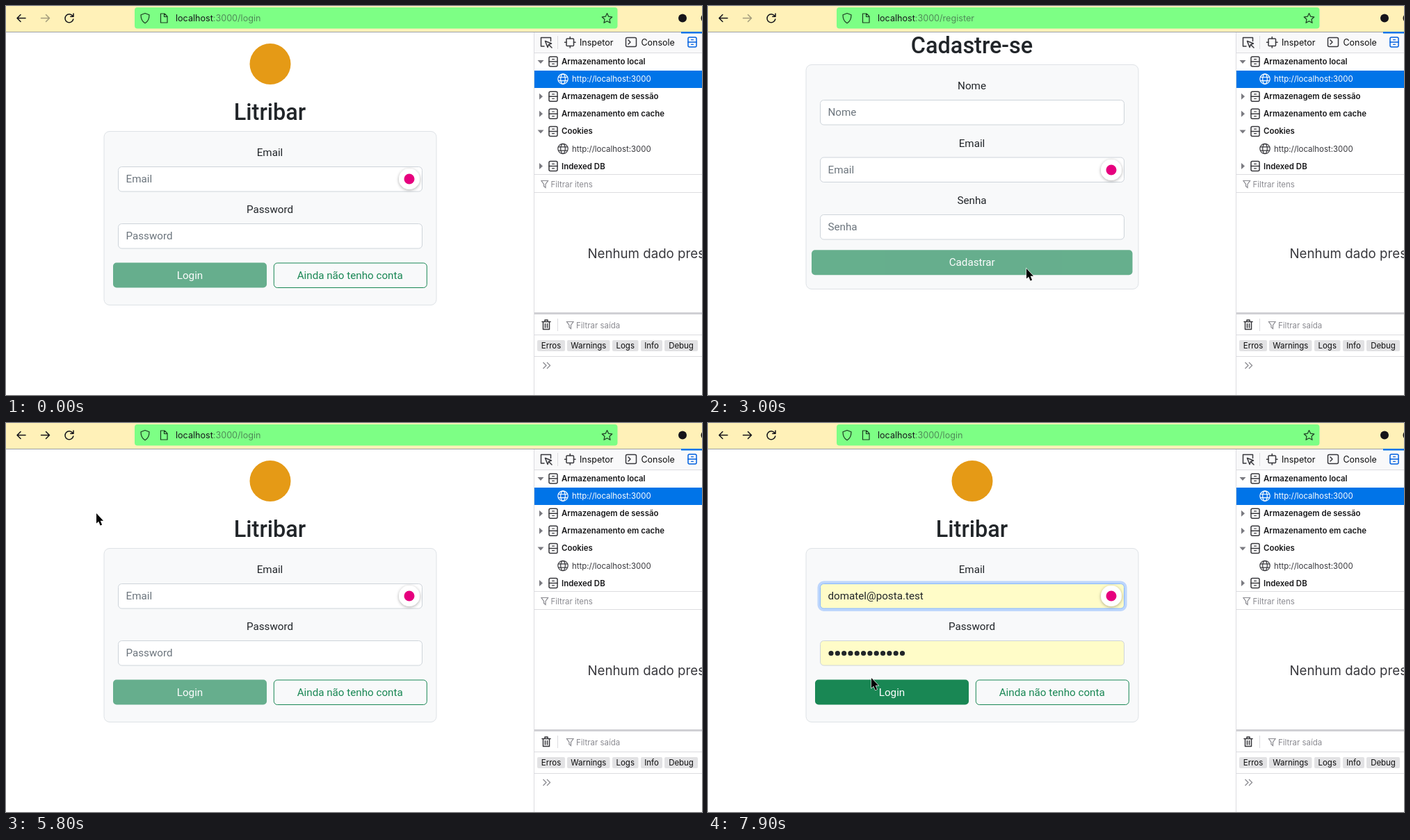
Recreate the animation shown at these times as an HTML page. Size 1001 px wide and 560 px high, loop 8000 ms.

```html
<!DOCTYPE html>
<html lang="pt-BR">
<head>
<meta charset="utf-8">
<title>Login</title>
<style>
  html, body { margin: 0; width: 100%; height: 100%; overflow: hidden; background: #fff; }
  svg { display: block; width: 100vw; height: 100vh; }
  text { white-space: pre; }
  .page { font: 15.2px Roboto, sans-serif; fill: #212529; text-anchor: middle; }
  .page .left { text-anchor: start; }
  .title { font-size: 32.4px; font-weight: 500; }
  .hint { fill: #6c757d; }
  .ui { font: 11.44px Inter, sans-serif; fill: #38383d; }
  .bold { font-weight: 600; fill: #18181a; }
  .tab { font-size: 12.48px; fill: #0c0c0d; }
  .menu { font: 12px Inter, sans-serif; fill: #1c1b22; }
  .muted { fill: #8a8a90; }
  .line { fill: none; stroke: currentColor; stroke-width: 1.5; stroke-linecap: round; stroke-linejoin: round; }
  .thin { stroke-width: 1.2; }
</style>
</head>
<body>
<svg id="stage" viewBox="0 0 1001 560">
  <defs>
    <filter id="shadow" x="-20%" y="-20%" width="140%" height="150%">
      <feDropShadow dx="0" dy="1" stdDeviation="2" flood-opacity=".35"/>
    </filter>
    <g id="cabinet" class="line">
      <rect x="-6" y="-7" width="12" height="14" rx="2"/>
      <path d="M-6 0H6"/><path class="thin" d="M-1.5-3.3h3M-1.5 3.3h3"/>
    </g>
    <g id="globe" class="line thin">
      <circle r="7.2"/><ellipse rx="3.3" ry="7.2"/><path d="M-6.5-2.6H6.5M-6.5 2.6H6.5"/>
    </g>
    <path id="funnel" d="M-4.5-5h9.5l-3.5 5v5l-2.5-2v-3z" fill="none" stroke="#8a8a90" stroke-width="1.2"/>
    <g id="badge">
      <circle r="15" fill="#fff" filter="url(#shadow)"/><circle r="7.5" fill="#e6007e"/>
    </g>
    <path id="beamShape" d="M-3-6.5Q0-6.5 0-4V4Q0 6.5-3 6.5M3-6.5Q0-6.5 0-4M0 4Q0 6.5 3 6.5M-1.5 1h3"/>
  </defs>

  <rect width="1001" height="37" fill="#fff1b8"/>
  <path d="M0 37.5H1001" stroke="#9ba0a3"/>
  <rect id="backHighlight" x="7" y="2" width="30" height="30.5" rx="4"/>
  <path class="line" color="#15141a" d="M28 17.5H16M21 12.5l-5 5 5 5"/>
  <path id="forwardArrow" class="line" d="M50.5 17.5h12M57.5 12.5l5 5-5 5"/>
  <path class="line" color="#15141a" d="M96 14.5a6 6 0 1 0 .8 4.5M97 11v4.2h-4.2"/>
  <rect x="185" y="2" width="694.5" height="30.5" rx="4" fill="#7dff85"/>
  <g class="line thin" color="#1c3a22">
    <path d="M200 10.5l6 2.2c0 6-1.5 9.5-6 12-4.5-2.5-6-6-6-12z"/>
    <path d="M222.5 11h5.5l4 4v9h-9.5zM227.5 11v4.5h4.5"/>
    <path d="M864.5 10.5l2.2 4.7 5.1.6-3.8 3.5 1 5-4.5-2.5-4.5 2.5 1-5-3.8-3.5 5.1-.6z"/>
  </g>
  <text class="ui" x="244" y="22" style="font-size:12.6px"><tspan fill="#15141a">localhost</tspan><tspan id="path" fill="#4f8a58"></tspan></text>
  <circle cx="973" cy="17.5" r="6" fill="#15141a"/>
  <circle cx="1006" cy="17.5" r="6.5" fill="#15141a"/>

  <g id="login" class="page"></g>
  <g id="register" class="page"></g>
  <g id="devtools" class="ui"></g>

  <g id="menu" class="menu"></g>
  <g id="tooltip" class="ui">
    <rect x="17" y="35" width="396" height="38" rx="3" fill="#f9f9fb" stroke="#c8c8cc" filter="url(#shadow)"/>
    <text x="24" y="51">Voltar uma página (Alt+Seta para a esquerda)</text>
    <text x="24" y="66">Clique com o botão direito ou pressione para ver o histórico</text>
  </g>

  <path id="arrow" d="M0 0V14.5L3.2 11.7 5.6 17.5 8.1 16.4 5.7 10.8H10Z" stroke="#fff" stroke-width="1.2" paint-order="stroke"/>
  <g id="beam" fill="none" stroke-linecap="round">
    <use href="#beamShape" stroke="#fff" stroke-width="2.6"/>
    <use href="#beamShape" stroke="#111" stroke-width="1.2"/>
  </g>
  <path id="hand" d="M-1.5 1.5q0-1.5 1.5-1.5t1.5 1.5v5l5.5 1q2 .5 2 2.5l-1 4.500-1 3h-7l-4.5-6.5q-.5-2 1.5-1.5l1.500 1.5z" stroke="#fff"/>
</svg>

<script>
const $ = id => document.getElementById(id);
const text = (x, y, s, cls = '', more = '') => `<text x="${x}" y="${y}" class="${cls}" ${more}>${s}</text>`;
const rect = (x, y, w, h, fill, more = '') => `<rect x="${x}" y="${y}" width="${w}" height="${h}" fill="${fill}" ${more}/>`;
const icon = (name, x, y, color) => `<use href="#${name}" x="${x}" y="${y}" color="${color}"/>`;

const card = (y, h) => rect(141, y, 478, h, '#f8f9fa', 'rx="8" stroke="#dee2e6"');
const field = (y, name, id = '') =>
  text(379.5, y - 15, name) +
  rect(161.5, y + .5, 437, 35.5, '#fff', `rx="5" stroke="#ced4da" id="${id}Box"`) +
  text(172.5, y + 23, name, 'left hint', `id="${id}Value"`);
const button = (x, y, w, label, id = '') =>
  `<g opacity=".65" id="${id}">${rect(x, y, w, 36, '#198754', 'rx="5"')}` +
  text(x + w / 2, y + 23, label, '', 'fill="#fff"') + '</g>';

$('login').innerHTML =
  '<circle cx="380" cy="83.5" r="29.5" fill="#e59a16"/>' +
  text(379.5, 164, 'Litribar', 'title') + card(180.5, 250) +
  rect(159.5, 229.5, 441, 39.5, 'none', 'id="ring" rx="7" stroke="#0d6efd" stroke-opacity=".25" stroke-width="4"') +
  field(231, 'Email', 'email') + field(313, 'Password', 'password') +
  '<path id="dots" d="M177 331.5H280" stroke="#212529" stroke-width="7.2" stroke-linecap="round" stroke-dasharray="0 9.32"/>' +
  '<path id="caret" d="M173.5 239.5v18" stroke="#212529"/>' +
  icon('badge', 580, 249) + button(154, 369.5, 221, 'Login', 'submit') +
  rect(385.3, 370, 220, 35.5, 'none', 'rx="5" stroke="#198754" id="signup"') +
  text(494.7, 392.5, 'Ainda não tenho conta', '', 'id="signupLabel"');

$('register').innerHTML =
  text(379.5, 68, 'Cadastre-se', 'title') + card(84.5, 323) +
  field(135, 'Nome') + field(217.5, 'Email') + field(300, 'Senha') +
  icon('badge', 580, 236) + button(149, 351.3, 461.5, 'Cadastrar');

// Storage tree rows: label, indented under its parent, open
const tree = [
  ['Armazenamento local', 0, 1], ['http://localhost:3000', 1], ['Armazenagem de sessão', 0, 0],
  ['Armazenamento em cache', 0, 0], ['Cookies', 0, 1], ['http://localhost:3000', 1], ['Indexed DB', 0, 0]
];
const rows = tree.map(([label, child, open], i) => {
  const y = 80 + i * 25.1, selected = i === 1, color = selected ? '#fff' : '#38383d';
  if (child) return (selected ? rect(760, 93, 241, 25, '#0074e8') : '') +
    icon('globe', 801, y, color) + text(814, y + 4, label, '', `style="fill:${color}"`);
  const twisty = open ? 'M764.5 -2h9l-4.5 5z' : 'M767 -4.5v9l5-4.5z';
  return `<path d="${twisty}" transform="translate(0 ${y})" fill="#7a7a80"/>` +
    icon('cabinet', 787, y, color) + text(799, y + 4, label, 'bold');
}).join('');
const filters = [['Erros', 764, 40], ['Warnings', 807, 61.5], ['Logs', 872, 37.5], ['Info', 913, 31], ['Debug', 947, 48]]
  .map(([label, x, w]) => rect(x, 481, w, 16, '#e2e2e4', 'rx="2"') +
    text(x + w / 2, 493, label, '', 'text-anchor="middle" fill="#0c0c0d"')).join('');

$('devtools').innerHTML =
  rect(760, 38, 241, 522, '#fff') + rect(760, 38, 241, 30, '#f9f9fa') + rect(971, 37, 30, 2.5, '#0074e8') +
  '<path d="M759.5 38V560M760 67.5H1001M793.5 43V62M760 242.5H1001M760 268.5H1001M760 473.5H1001M760 504.5H1001M793.5 450V468" stroke="#dcdce0" fill="none"/>' +
  rect(760, 441, 241, 3, '#d0d0d4') +
  '<g class="line" color="#38383d"><path d="M774 58h-4.5v-12.5h14v5M775.5 50.5l9 3.5-4 1.5-1.5 4zM781 56l4 4"/>' +
  '<rect x="806" y="47" width="10.5" height="10.5" rx="1"/><path d="M811.25 44.5v2.5M811.25 57.5v2.5M803.5 52.25h2.5M816.5 52.25h2.5"/>' +
  '<rect x="891.5" y="45.5" width="15" height="13" rx="2"/><path d="M895 49l3 3-3 3"/>' +
  '<path d="M771 454.5h12M775 454v-2h4v2M772.5 455v10.5h9V455M775.5 457.5v5.5M778.5 457.5v5.5"/></g>' +
  icon('cabinet', 987, 52, '#0060df') +
  text(825, 56.5, 'Inspetor', 'tab') + text(913.5, 56.5, 'Console', 'tab') + rows +
  icon('funnel', 774.5, 256.5) + text(783.5, 260.5, 'Filtrar itens', 'muted') +
  text(836.5, 363, 'Nenhum dado presente', '', 'style="font-size:18.7px"') +
  icon('funnel', 811, 459.5) + text(820, 463.5, 'Filtrar saída', 'muted') + filters +
  '<path d="M772.5 513l4.5 4.5-4.5 4.5M778 513l4.5 4.5-4.5 4.5" fill="none" stroke="#8a8a90" stroke-width="1.3"/>';

const accounts = ['brenodalmonte58@posta.test', 'dalmamorim@posta.test', 'domatel@posta.test'];
$('menu').innerHTML =
  rect(161, 267, 436.5, 155, '#fff', 'rx="3" stroke="#b0b0b4" stroke-width=".8" filter="url(#shadow)"') +
  rect(162, 348, 434, 38.5, '#dadbdc', 'id="hover"') +
  accounts.map((mail, i) => {
    const y = 282.5 + i * 38.2;
    return `<circle cx="174.5" cy="${y}" r="7" fill="#72bfe9"/>` +
      text(185.5, y + 4, mail) + text(185.5, y + 20, 'deste site', 'muted');
  }).join('') +
  rect(162, 386.5, 434, 32, '#ebebeb') + '<path d="M162 386.5H596" stroke="#cfcfd2"/>' +
  text(378, 407, 'Ver contas de acesso salvas', '', 'text-anchor="middle"');

// Pointer path: time, x, y
const pointer = [
  [100, 319, 54], [200, 327, 151], [300, 327, 151], [400, 306, 226], [500, 306, 226], [600, 303, 235], [700, 301, 241],
  [1000, 301, 241], [1100, 377, 311], [1200, 432, 357], [1300, 456, 378], [1400, 464, 385], [2900, 464, 385],
  [3000, 458, 378], [3200, 380, 308], [3600, 95, 75], [3800, 27, 18], [3900, 14, 13],
  [5500, 14, 13], [5800, 130, 130], [6000, 222, 235], [6100, 232, 253.5],
  [7000, 232, 253.5], [7100, 233, 275], [7200, 234, 322], [7300, 235, 361], [7500, 235, 367], [8000, 235, 367]
];
function pointerAt(t) {
  const i = Math.max(1, pointer.findIndex(p => p[0] >= t));
  const [t0, x0, y0] = pointer[i - 1], [t1, x1, y1] = pointer[i];
  const k = (t - t0) / (t1 - t0);
  return [x0 + (x1 - x0) * k, y0 + (y1 - y0) * k];
}

const show = (id, on) => $(id).style.display = on ? '' : 'none';
const between = (t, a, b) => t >= a && t < b;

function render(t) {
  const registering = between(t, 2000, 5500), filled = t >= 7700, focused = t >= 6300;
  show('login', !registering);
  show('register', registering);
  $('path').textContent = ':3000/' + (registering ? 'register' : 'login');
  $('forwardArrow').style.color = t >= 5500 ? '#15141a' : '#a39c7c';
  show('backHighlight', between(t, 3800, 5700));
  $('backHighlight').style.fill = between(t, 5400, 5500) ? '#b5aa82' : '#dacf9d';
  show('tooltip', between(t, 4400, 5400));

  const signupHover = between(t, 1300, 2000);
  $('signup').style.fill = signupHover ? (t < 1400 ? '#6db292' : '#198754') : 'none';
  $('signupLabel').style.fill = signupHover ? '#fff' : '#198754';

  show('ring', focused);
  $('ring').style.opacity = t < 6400 ? .6 : 1;
  $('emailBox').style.stroke = focused ? '#86b7fe' : '';
  show('caret', focused && !filled);
  for (const id of ['emailBox', 'passwordBox']) $(id).style.fill = filled ? '#fffcc8' : '#fff';
  $('emailValue').textContent = filled ? accounts[2] : 'Email';
  $('emailValue').style.fill = filled ? '#212529' : '';
  show('passwordValue', !filled);
  show('dots', filled);
  $('submit').style.opacity = filled ? 1 : .65;

  show('menu', between(t, 6400, 7700));
  show('hover', t >= 7100);
  $('hover').setAttribute('y', t < 7200 ? 267.5 : t < 7300 ? 309.5 : 348);

  const shape = t < 100 ? '' : between(t, 1300, 2100) ? 'hand' : between(t, 6100, 7100) ? 'beam' : 'arrow';
  const [x, y] = pointerAt(Math.max(t, 100));
  for (const id of ['arrow', 'beam', 'hand']) {
    show(id, id === shape);
    $(id).setAttribute('transform', `translate(${x} ${y})`);
  }
}

const start = performance.now();
function tick() {
  const t = (performance.now() - start) % 8000;
  render(Math.floor(t / 100) * 100);
  requestAnimationFrame(tick);
}
tick();
</script>
</body>
</html>
```
